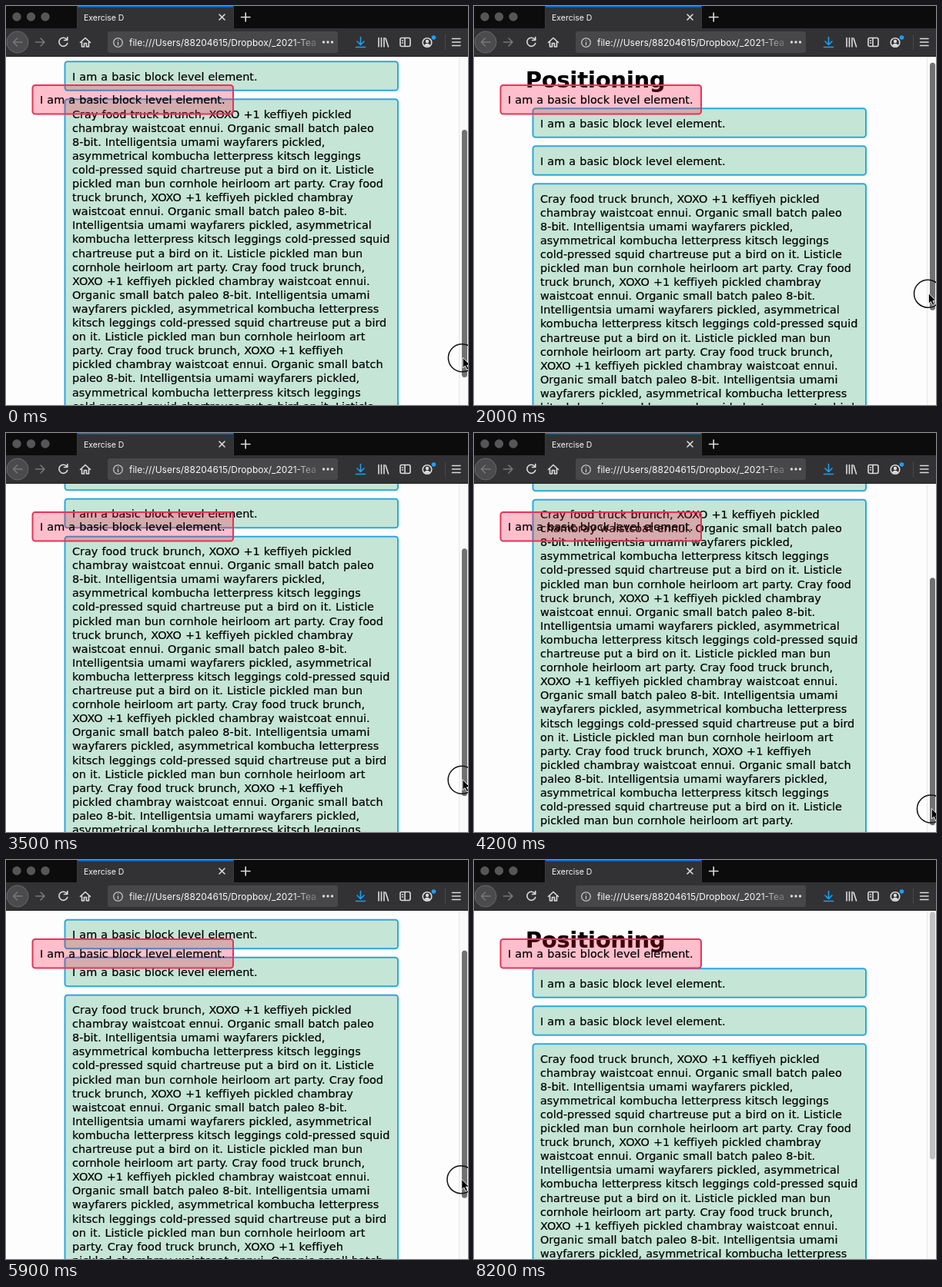
Recreate the animation shown at these times as an HTML page. Size 600 px wide and 519 px high, loop 8300 ms.

```html
<!DOCTYPE html>
<html lang="en">
<head>
<meta charset="utf-8">
<title>Exercise D</title>
<style>
html, body { margin: 0; width: 100%; height: 100%; overflow: hidden; background: #fefdfe; }
svg { display: block; width: 600px; height: 519px; }
text { white-space: pre; }
#view text { font: 14.43px "DejaVu Sans", sans-serif; word-spacing: .5px; font-variant-ligatures: none; stroke: #000; stroke-width: .2; }
#view .title { font-weight: bold; font-size: 28.6px; }
.block { fill: #c5e5d6; stroke: #2ba9dc; stroke-width: 2; }
.fixed { fill: rgba(255, 0, 50, .25); stroke: #ea3256; stroke-width: 2; }
.ui { font-family: Inter, sans-serif; fill: #f9f9fa; }
.icon { fill: none; stroke: #dcdcde; stroke-width: 1.6; stroke-linecap: round; stroke-linejoin: round; }
.dim { stroke: #77777a; }
.blue { stroke: #1c9ff5; }
</style>
</head>
<body>
<svg viewBox="0 0 600 519">
  <defs>
    <clipPath id="viewport"><rect y="66" width="600" height="453"/></clipPath>
    <linearGradient id="fade" gradientUnits="userSpaceOnUse" x1="372" x2="406">
      <stop stop-color="#f9f9fa"/><stop offset="1" stop-color="#f9f9fa" stop-opacity=".15"/>
    </linearGradient>
  </defs>

  <g id="view" clip-path="url(#viewport)">
    <rect y="66" width="600" height="453" fill="#fefdfe"/>
    <g id="page"><text class="title" x="67" y="114">Positioning</text></g>
    <g id="badge"></g>
    <rect x="588" y="66" width="12" height="453" fill="#fafafa"/>
    <path d="M588.5 66V519" stroke="#e6e6e6"/>
    <rect id="thumb" x="592" width="7" height="322" rx="3.5"/>
  </g>

  <rect width="600" height="30" fill="#0c0c0d"/>
  <rect y="29" width="600" height="37" fill="#323234"/>
  <path d="M0 65.5H600" stroke="#1b1b1c"/>
  <g fill="#565658"><circle cx="14" cy="14" r="5.7"/><circle cx="32.5" cy="14" r="5.7"/><circle cx="51" cy="14" r="5.7"/></g>
  <rect x="93" width="202" height="30" fill="#323234"/>
  <rect x="93" width="202" height="1.5" fill="#0a78ee"/>
  <path d="M92.5 0V29M295.5 0V29" stroke="#3a3a3c"/>
  <text class="ui" x="101" y="18.5" font-size="10.5">Exercise D</text>

  <circle cx="15" cy="47" r="14" fill="#4b4b4d" stroke="#68686a"/>
  <rect x="132" y="33" width="299" height="28" rx="3" fill="#474749"/>
  <text class="ui" x="160" y="51.5" font-size="12" style="fill:url(#fade)">file:///Users/88204615/Dropbox/_2021-Tea</text>
  <g fill="#dcdcde"><circle cx="412.5" cy="47" r="1.7"/><circle cx="418" cy="47" r="1.7"/><circle cx="423.5" cy="47" r="1.7"/></g>
  <path d="M570.5 37V57" stroke="#48484a"/>

  <g class="icon">
    <path d="M277 11L284 18M284 11L277 18"/>
    <path d="M305.5 14.5H317M311.2 9V20"/>
    <path class="dim" d="M21 47H9.5M14.5 42L9.5 47L14.5 52M38.5 47H50M45 42L50 47L45 52"/>
    <path d="M79 43.5A5.6 5.6 0 1 0 79.8 48.5M79.8 40.5V44.5H75.5"/>
    <path d="M96.5 47.5L103 41.5L109.5 47.5M98.5 46.5V53H101.5V48.5H104.5V53H107.5V46.5"/>
    <g stroke-width="1.1"><circle cx="145.5" cy="47.5" r="5.8"/><path d="M145.5 47V50.5M145.5 44.4V44.5"/></g>
    <path class="blue" d="M460.5 40.5V49.5M456 46L460.5 50.5L465 46M454.5 53.5H466.5"/>
    <path d="M484 41.5V53M487.5 41.5V53M491 41.5V53M493 42L496.5 53"/>
    <rect x="512" y="41.5" width="13" height="11" rx="2"/>
    <path d="M518 42V52M514.5 45H515.5M514.5 48H515.5"/>
    <circle cx="547" cy="47.5" r="5.8"/>
    <path d="M579.5 42.5H590M579.5 47H590M579.5 51.5H590"/>
  </g>
  <circle cx="547" cy="46" r="2.2" fill="#dcdcde"/>
  <path d="M543 51Q547 46.5 551 51Q547 54 543 51Z" fill="#dcdcde"/>
  <circle cx="555.5" cy="41" r="2.8" fill="#1c9ff5"/>

  <g id="cursor">
    <circle r="18" fill="none" stroke="#111" stroke-width="1.5"/>
    <path d="M.8 -.5V13L3.9 10.3L6.2 15.3L8.6 14.2L6.3 9.4H10.5Z" fill="#000" stroke="#fff" stroke-width=".9"/>
  </g>
</svg>
<script>
const LABEL = 'I am a basic block level element.';
const PARAGRAPH = `Cray food truck brunch, XOXO +1 keffiyeh pickled
chambray waistcoat ennui. Organic small batch paleo
8-bit. Intelligentsia umami wayfarers pickled,
asymmetrical kombucha letterpress kitsch leggings
cold-pressed squid chartreuse put a bird on it. Listicle
pickled man bun cornhole heirloom art party. Cray food
truck brunch, XOXO +1 keffiyeh pickled chambray
waistcoat ennui. Organic small batch paleo 8-bit.
Intelligentsia umami wayfarers pickled, asymmetrical
kombucha letterpress kitsch leggings cold-pressed squid
chartreuse put a bird on it. Listicle pickled man bun
cornhole heirloom art party. Cray food truck brunch,
XOXO +1 keffiyeh pickled chambray waistcoat ennui.
Organic small batch paleo 8-bit. Intelligentsia umami
wayfarers pickled, asymmetrical kombucha letterpress
kitsch leggings cold-pressed squid chartreuse put a bird
on it. Listicle pickled man bun cornhole heirloom art
party. Cray food truck brunch, XOXO +1 keffiyeh
pickled chambray waistcoat ennui. Organic small batch
paleo 8-bit. Intelligentsia umami wayfarers pickled,
asymmetrical kombucha letterpress kitsch leggings
cold-pressed squid chartreuse put a bird on it. Listicle
pickled man bun cornhole heirloom art party.`;

const LOOP = 8300, STEP = 100, LINE = 18.1, RELEASE = 7200;
const SCROLL = [[0, 118], [500, 49], [1000, 8], [1500, 0], [2000, 8], [2700, 48], [3500, 104.5],
  [4200, 152.5], [4700, 165], [5200, 128], [5900, 63.5], [6400, 25], [6900, 0], [LOOP, 0]];

const $ = id => document.getElementById(id);

function add(parent, name, attrs, content = '') {
  const el = document.createElementNS('http://www.w3.org/2000/svg', name);
  for (const key in attrs) el.setAttribute(key, attrs[key]);
  el.textContent = content;
  parent.append(el);
}

function addBox(parent, className, x, y, width, content) {
  const lines = content.split('\n');
  const height = 37.5 + (lines.length - 1) * LINE;
  add(parent, 'rect', { class: className, x: x + 1, y: y + 1, width: width - 2, height, rx: 3.5 });
  lines.forEach((line, i) => add(parent, 'text', { x: x + 10.5, y: y + 25.3 + i * LINE }, line));
}

// Cubic Hermite curve through the scroll keys
function scrollAt(t) {
  const i = Math.max(0, SCROLL.findIndex(key => key[0] > t) - 1);
  const slope = k => {
    const [t0, s0] = SCROLL[Math.max(k - 1, 0)];
    const [t1, s1] = SCROLL[Math.min(k + 1, SCROLL.length - 1)];
    return (s1 - s0) / (t1 - t0);
  };
  const [ta, a] = SCROLL[i], [tb, b] = SCROLL[i + 1];
  const d = tb - ta, u = (t - ta) / d, v = 1 - u;
  const s = v * v * (a * (1 + 2 * u) + slope(i) * d * u) + u * u * (b * (1 + 2 * v) - slope(i + 1) * d * v);
  return t > 6900 ? 0 : Math.max(0, s);
}

function draw(now) {
  const t = Math.floor(now % LOOP / STEP) * STEP;
  const scroll = scrollAt(t), lead = scrollAt(t + 25);
  $('page').setAttribute('transform', `translate(0 ${-scroll})`);
  $('thumb').setAttribute('y', 67.4 + scroll * .793);
  $('thumb').setAttribute('fill', t < RELEASE ? '#717171' : '#c1c1c1');
  $('cursor').setAttribute('transform', `translate(${589.3 + lead * .027} ${367 + lead * .793})`);
  $('cursor').setAttribute('visibility', t < RELEASE ? 'visible' : 'hidden');
}

addBox($('page'), 'block', 75.5, 140.2, 434.5, LABEL);
addBox($('page'), 'block', 75.5, 189.2, 434.5, LABEL);
addBox($('page'), 'block', 75.5, 238.2, 434.5, PARAGRAPH);
addBox($('badge'), 'fixed', 33.5, 102, 262.5, LABEL);

const start = performance.now();
function tick() {
  draw(performance.now() - start);
  requestAnimationFrame(tick);
}
tick();
</script>
</body>
</html>
```
